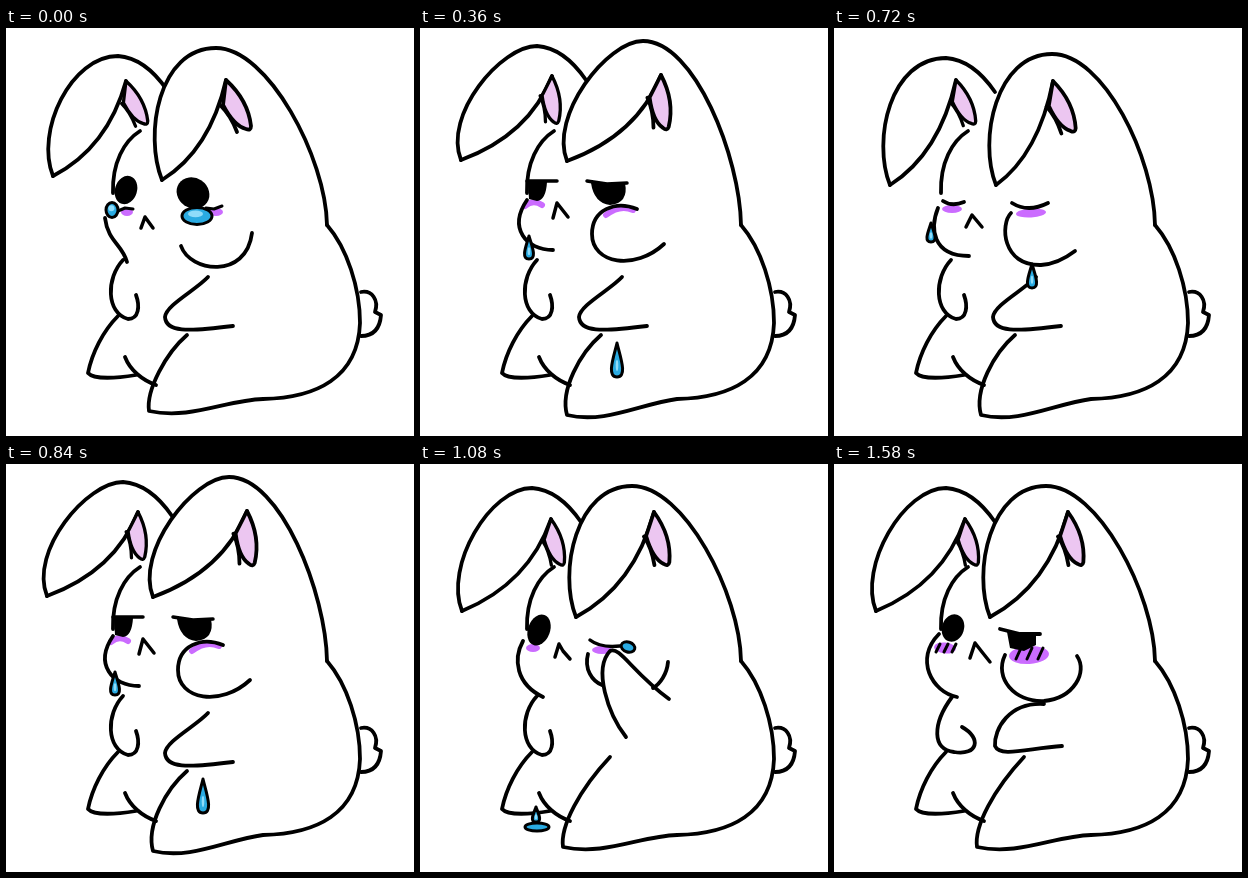
Write an HTML page with a canvas that moves like this. It is 408 by 408 pixels and loops after 1700 ms.

```html
<!DOCTYPE html>
<html lang="en">
<head>
<meta charset="utf-8">
<title>Crying bunny</title>
<style>
  html, body { margin: 0; width: 100%; height: 100%; overflow: hidden; background: #fff; }
  canvas { display: block; width: 100vw; height: 100vh; }
</style>
</head>
<body>
<canvas id="stage" width="408" height="408"></canvas>
<script>
const ctx = document.getElementById('stage').getContext('2d');
const LOOP = 1700, INK = '#000', BLUSH = '#cb6cff', PINK = '#ecc6f1', BLUE = '#2aabe2', SHINE = '#8fdcfa';

function shape(path, fill, width) {
  const outline = new Path2D(path);
  if (fill) { ctx.fillStyle = fill; ctx.fill(outline); }
  if (width) { ctx.lineWidth = width; ctx.stroke(outline); }
}
const ink = (path, width = 3.8) => shape(path, null, width);

function oval(x, y, rx, ry, tilt, fill, width) {
  const outline = new Path2D();
  outline.ellipse(x, y, rx, ry, tilt, 0, 2 * Math.PI);
  shape(outline, fill, width);
}

function blushStroke(path) {
  ctx.strokeStyle = BLUSH;
  ink(path, 6);
  ctx.strokeStyle = INK;
}

// Tears

function pool(x, y, rx, ry) {
  oval(x, y, rx, ry, 0, BLUE, 3);
  oval(x - rx * .1, y - ry * .25, rx * .5, ry * .4, 0, SHINE);
}

function drop(x, top, h) {
  const w = 4 + h / 5, low = top + h;
  shape(`M${x} ${top}C${x + w * .3} ${top + h * .4} ${x + w} ${low} ${x} ${low}
    C${x - w} ${low} ${x - w * .3} ${top + h * .4} ${x} ${top}`, BLUE, 3);
  oval(x, top + h * .66, 1.3, h * .17, 0, SHINE);
}

function splash(x, y, rx) {
  oval(x, y, rx, 4, 0, BLUE, 3);
  drop(x - 1, y - 20, 15);
}

const cheekTears = () => { drop(97, 195, 19); drop(198, 236, 24); };
const fallingTears = () => { drop(109, 208, 23); drop(197, 315, 34); };
const landingTears = () => { drop(117, 309, 25); splash(204, 390, 16); };
const lastTear = () => splash(117, 363, 12);

// Ears are given as [tip x, y, crown x, y, fold x, y]; turn tilts the pink fold.
const poses = {
  sad: { left: [47, 148, 112, 28, 120, 53], right: [156, 152, 210, 20, 220, 52], turn: 0, sag: 0 },
  low: { left: [56, 157, 112, 30, 122, 52], right: [162, 157, 218, 26, 219, 53], turn: .05, sag: 4 },
  high: { left: [41, 132, 117, 18, 132, 48], right: [147, 133, 223, 13, 241, 47], turn: .35, sag: 4 },
  calm: { left: [42, 147, 112, 24, 131, 55], right: [156, 153, 212, 22, 234, 48], turn: .2, sag: 0 }
};

const mix = (a, b, t) => Array.isArray(a) ? a.map((v, i) => mix(v, b[i], t)) : a + (b - a) * t;
const between = (a, b) => Object.fromEntries(Object.keys(a).map(k => [k, mix(a[k], b[k], .5)]));
poses.sinking = between(poses.sad, poses.low);

function ear([tipX, tipY, crownX, crownY, foldX, foldY], turn, size, rim) {
  const handle = 112 - (crownX - tipX);
  shape(`M${tipX} ${tipY}C${tipX - 18} ${tipY - 45} ${crownX - handle} ${crownY} ${crownX} ${crownY}${rim}`, '#fff', 3.8);
  ink(`M${tipX} ${tipY}Q${mix(tipX, foldX, .75)} ${mix(tipY, foldY, .3)} ${foldX} ${foldY}`);
  ctx.save();
  ctx.translate(foldX, foldY);
  ctx.rotate(turn);
  ctx.scale(size, size);
  shape('M0 0Q22 20 25 46Q25 51 20 49Q8 46 -3 25Z', PINK, 3.8);
  ink('M-5 26Q5 36 11 52');
  ctx.restore();
}

function drawBody({ left, right, turn, sag }, knee) {
  ear(left, turn, .87, 'q27 2 49 34');
  ear(right, turn, 1, `c52 0 ${320 - right[2]} ${130 - right[3]} ${321 - right[2]} ${197 - right[3]}`);
  ink(`M321 197C341 220 354 260 354 295C352 350 310 370 257 371
    C220 ${372 + sag} 185 ${392 + sag} ${143 + sag} ${383 + sag}C140 362 160 325 ${knee}`);
  ink('M355 264C366 262 373 272 369 284L375 287C374 300 368 308 355 308');
  ink('M134 103C118 113 106 135 107 165');
  ink('M112 288C97 303 86 325 82 345C88 352 112 350 130 347');
  ink('M119 329C124 342 136 352 150 357');
}

const chest = 'M117 232C100 250 100 285 122 291C133 291 134 278 130 267';
const hug = chest + 'M202 249C190 262 160 277 159 289C160 304 180 304 227 298';
const calmChest = chest + 'M103 177C93 195 96 220 123 233';

// Faces, with the cheeks and paws that belong to them

function openFace() {
  ink(hug + 'M99 190C102 214 116 216 121 234M175 218C184 244 240 252 246 205');
  oval(120, 162, 11, 14.5, .3, INK);
  oval(187, 165, 17, 15, .6, INK);
  oval(121, 184, 6, 4, 0, BLUSH);
  oval(210, 184, 7, 4, 0, BLUSH);
  ink('M112 183L119 180L127 181M200 180L208 181L216 178', 3);
  pool(106, 182, 6, 7.5);
  pool(191, 188, 15, 8.5);
  ink('M135 200L139 189L147 200', 3.5);
}

function closingFace() {
  ink(hug + 'M99 190C102 214 116 220 127 231M175 205C176 244 236 248 244 214');
  shape('M109 165H131Q129 181 118 180Q110 178 109 165M173 165H206Q206 181 190 181Q174 181 173 165', INK, 3);
  oval(121, 184, 8, 4, 0, BLUSH);
  oval(208, 186, 8, 4, 0, BLUSH);
  pool(103, 187, 6, 9);
  pool(191, 190, 15, 9);
  ink('M134 199L138 188L147 199', 3.5);
}

function shutFace() {
  ink(hug + 'M104 180C96 200 98 228 135 228M177 185C166 196 168 238 207 237Q224 236 241 223');
  oval(118, 181, 10, 4, 0, BLUSH);
  oval(197, 185, 15, 4.5, -.06, BLUSH);
  ink('M109 173Q118 179 130 174M178 175Q194 185 214 175');
  ink('M132 199L138 187L148 199', 3.5);
}

function sulkFace() {
  blushStroke('M105 178Q113 171 122 177M186 187Q200 176 213 182');
  ink(hug + 'M107 172C88 200 106 222 133 222M217 181C195 172 172 182 172 206C172 236 215 243 244 216');
  shape('M108 154H127Q126 172 117 173L109 171ZM171 155H205Q209 175 190 177Q174 175 171 155', INK);
  ink('M107 153L137 153M167 153L187 156L207 155', 3.5);
  ink('M133 190L137 175L148 189', 3.5);
}

function wipeFace() {
  oval(113, 184, 7, 4, 0, BLUSH);
  oval(182, 186, 10, 4, 0, BLUSH);
  ink(calmChest + 'M168 190C164 205 172 217 182 221M248 198C247 210 240 220 233 224');
  ink('M206 273C188 250 173 205 190 187C200 182 212 208 249 235');
  oval(119, 166, 11, 16, .35, INK);
  ink('M170 176Q180 184 200 182', 3.5);
  ink('M135 193L139 180L143 187L150 195', 3.5);
  oval(208, 183, 7, 5, .3, BLUE, 3);
}

function squintFace(pawShift) {
  oval(127, 188, 17, 4.5, .5, BLUSH);
  oval(197, 187, 20, 6, .3, BLUSH);
  ink(calmChest + 'M178 194C183 207 194 222 208 229');
  shape('M113 166L134 159Q140 180 126 181L114 177Z', INK);
  ink('M109 165Q122 164 135 157M173 174Q190 181 212 181M201 187L216 191M201 194L216 199', 3.3);
  ink('M147 198L148 179L160 188L170 196', 3.5);
  ctx.save();
  ctx.translate(pawShift, 0);
  ink('M208 272C204 235 214 186 253 185C252 210 254 230 262 246M262 187C275 205 275 220 262 230');
  oval(258, 185, 5, 5, 0, BLUE, 3);
  ctx.restore();
}

function poutFace(armShift) {
  oval(111, 184, 11, 5.5, .1, BLUSH);
  oval(195, 191, 20, 9, -.06, BLUSH);
  ink('M105 170C80 195 98 228 123 233M171 191C160 214 180 238 210 237C240 234 254 208 243 192');
  ink('M118 233C98 260 98 286 120 288C144 292 148 274 128 263');
  ink(`M210 ${240 + armShift}C175 238 160 265 161 282C166 294 195 284 228 282`);
  oval(119, 164, 11, 14, .3, INK);
  shape('M173 168L202 171V181L190 187L176 184Z', INK);
  ink('M166 165L186 170L206 170');
  for (let i = 0; i < 3; i++) ink(`M${102 + 8 * i} 188l4 -8M${182 + 11 * i} 195l5 -11`, 3);
  ink('M136 194L141 179L148 188L156 198', 3.5);
}

const { sad, sinking, low, high, calm } = poses;
const cry = [
  [sad, openFace, landingTears],
  [sinking, closingFace, lastTear],
  [low, shutFace, cheekTears],
  [high, sulkFace, fallingTears]
];
const wipe = [
  [1080, wipeFace, lastTear],
  [1200, () => squintFace(-12)],
  [1350, () => squintFace(0)],
  [1500, () => poutFace(-3)],
  [1580, () => poutFace(0)]
];

function drawScene(time) {
  if (time < wipe[0][0]) {
    const step = Math.floor(time / 120);
    const [pose, face, tears] = cry[step % cry.length];
    drawBody(pose, '181 307');
    face();
    if (step > 1) tears();
  } else {
    const [, face, tears] = wipe.findLast(([at]) => at <= time);
    drawBody(calm, '190 293');
    face();
    tears?.();
  }
}

ctx.lineCap = ctx.lineJoin = 'round';
ctx.strokeStyle = INK;
const start = performance.now();

function render() {
  ctx.clearRect(0, 0, 408, 408);
  drawScene((performance.now() - start) % LOOP);
  requestAnimationFrame(render);
}
render();
</script>
</body>
</html>
```
